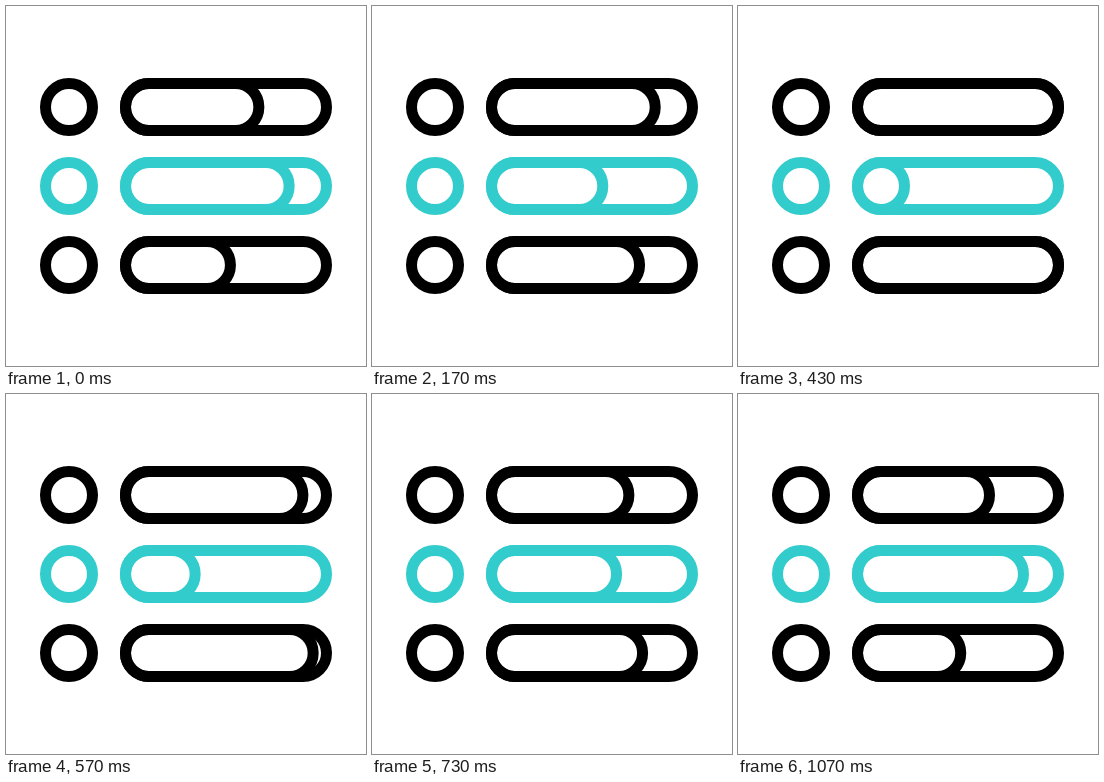
An HTML page with a canvas for the animation above (1670 ms loop, 360x360 px).

```html
<!DOCTYPE html>
<html lang="en">
<head>
<meta charset="utf-8">
<title>Sliding bars</title>
<style>
  html, body { margin: 0; width: 100%; height: 100%; overflow: hidden; background: #fff; }
  canvas { display: block; width: 360px; height: 360px; }
</style>
</head>
<body>
<canvas id="stage" width="360" height="360"></canvas>
<script>
const ctx = document.getElementById('stage').getContext('2d');

const LOOP = 1670, STEP = 100 / 3, LAST = 32;
const LINE = 11, R = 23.5;
const LEFT = 114, RIGHT = 326;

// rest and reach: outer right edge of the divider; back: steps of the return move
const rows = [
  { y: 101, color: '#000', rest: 257, reach: RIGHT, back: 11.6 },
  { y: 180, color: '#33cccc', rest: 291, reach: 172, back: 16.5 },
  { y: 259, color: '#000', rest: 228, reach: RIGHT, back: 20 }
];

const clamp = v => Math.min(1, Math.max(0, v));
const smooth = u => u * u * (3 - 2 * u);

function edge(row, n) {
  const out = smooth(clamp((n + 1.07) / 12.83));
  const u = clamp((n - 13) / row.back);
  const home = smooth(1 - Math.pow(1 - u, 1.18));
  return row.rest + (row.reach - row.rest) * (out - home);
}

function pill(right, y) {
  const l = LEFT + LINE / 2, r = right - LINE / 2;
  ctx.beginPath();
  ctx.arc(l + R, y, R, Math.PI / 2, Math.PI * 1.5);
  ctx.arc(r - R, y, R, -Math.PI / 2, Math.PI / 2);
  ctx.closePath();
  ctx.stroke();
}

function draw(time) {
  // the motion advances in 30 fps steps, then rests
  const n = Math.min(LAST, Math.floor((time % LOOP + 3.4) / STEP));
  ctx.fillStyle = '#fff';
  ctx.fillRect(0, 0, 360, 360);
  ctx.lineWidth = LINE;
  for (const row of rows) {
    ctx.strokeStyle = row.color;
    ctx.beginPath();
    ctx.arc(63, row.y, R, 0, Math.PI * 2);
    ctx.stroke();
    pill(RIGHT, row.y);
    pill(edge(row, n), row.y);
  }
}

const start = performance.now();
function tick() {
  draw(performance.now() - start);
  requestAnimationFrame(tick);
}
tick();
</script>
</body>
</html>
```
